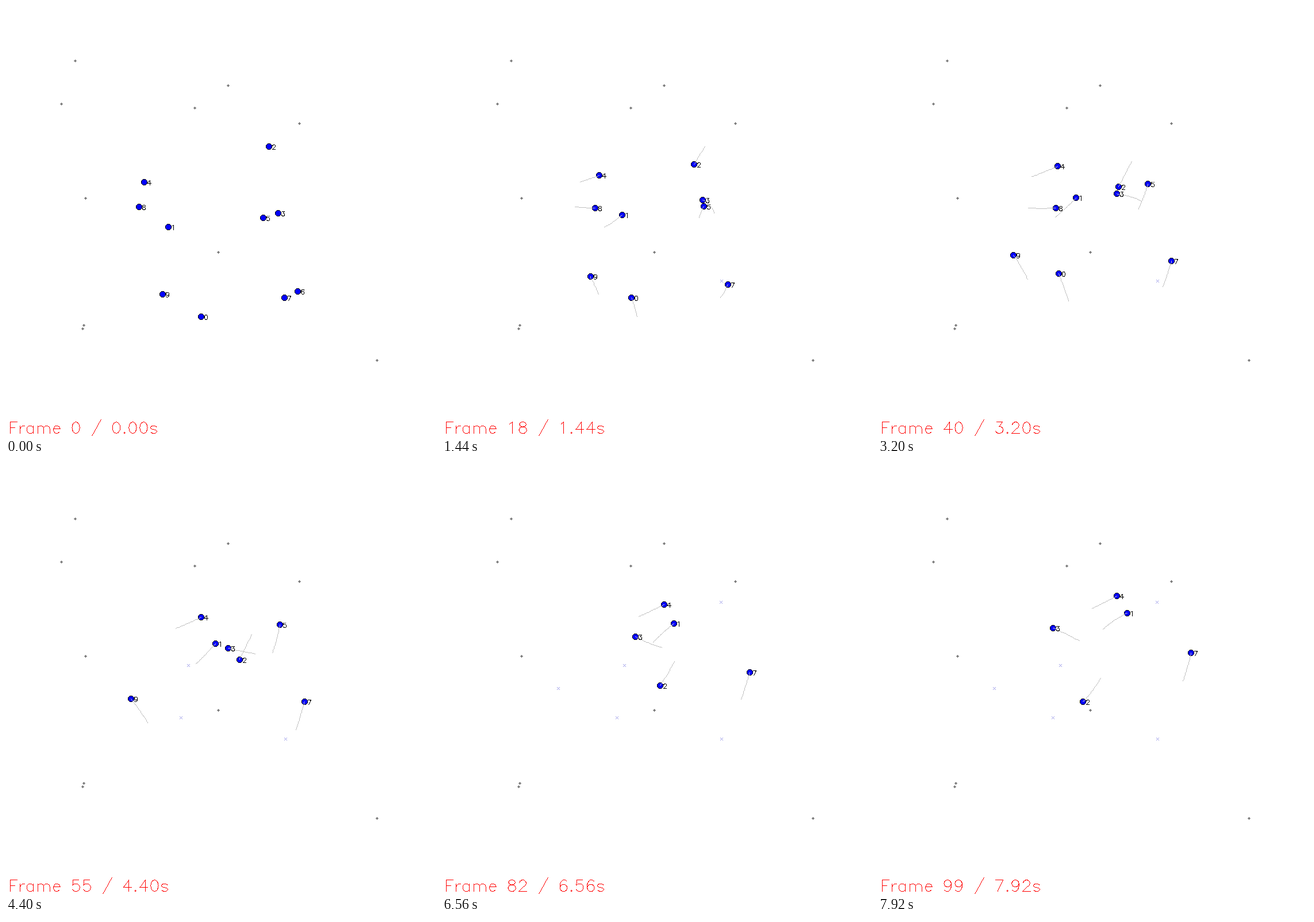
A matplotlib script that plays this animation: 748 by 748 pixels, repeating every 8 s.

```python
import numpy as np
import matplotlib.pyplot as plt
from matplotlib.animation import FuncAnimation

SIZE, FRAMES, STEP_MS, TRAIL = 748, 100, 80, 25
PX = 0.72  # one pixel in points at 100 dpi
plt.rcParams["path.simplify"] = False


def arc(cx, cy, rx, ry, start, end):
    a = np.radians(np.linspace(start, end, 17))
    return list(zip(cx + rx * np.cos(a), cy + ry * np.sin(a)))


# Stroke font: advance width and strokes; y runs from 0 (cap top) to 21 (baseline).
GLYPHS = {" ": (16, [])}


def glyph(char, width, *strokes):
    GLYPHS[char] = (width, [np.array(s, float) for s in strokes])


six = arc(11.5, 10.5, 7.5, 10.5, -50, -180) + arc(10.5, 14.5, 6.5, 6.5, 180, -180)
arch = arc(9.5, 12.5, 5.5, 5.5, 180, 360) + [(15, 21)]
glyph("0", 20, arc(10, 10.5, 7, 10.5, 0, 360))
glyph("1", 20, [(6, 4), (11, 0), (11, 21)])
glyph("2", 20, arc(10, 6, 6, 6, 190, 390) + [(3, 21), (17, 21)])
glyph("3", 20, [(5, 0), (16, 0), (10, 8)] + arc(10, 14.5, 7, 6.5, -65, 155))
glyph("4", 20, [(13, 21), (13, 0), (3, 14), (18, 14)])
glyph("5", 20, [(15, 0), (5, 0), (4, 9)] + arc(10, 14, 7, 7, -135, 150))
glyph("6", 20, six)
glyph("7", 20, [(3, 0), (17, 0), (7, 21)])
glyph("8", 20, arc(10, 4.5, 6, 4.5, 0, 360), arc(10, 15, 7, 6, 0, 360))
glyph("9", 20, [(20 - x, 21 - y) for x, y in six])
glyph("F", 18, [(4, 21), (4, 0), (17, 0)], [(4, 10), (12, 10)])
glyph("r", 13, [(4, 7), (4, 21)], arc(11, 14, 7, 7, 180, 280))
glyph("a", 19, [(15, 7), (15, 21)], arc(9.5, 14, 6.5, 7, -35, -325))
glyph("m", 30, [(4, 7), (4, 21)], arch, [(x + 11, y) for x, y in arch])
glyph("e", 18, [(3, 13), (15, 13)] + arc(9, 14, 6, 7, -10, -320))
glyph("s", 17, arc(8.5, 10.5, 5.5, 3.5, -20, -250) + arc(8.5, 17.5, 5.5, 3.5, -70, 160))
glyph(".", 10, arc(5, 20, 1, 1, 0, 360))
glyph("/", 22, [(20, -4), (2, 28)])


def trace(stroke):
    """Pixels along a one-pixel polyline."""
    pixels = []
    for a, b in zip(stroke[:-1], stroke[1:]):
        steps = max(1, int(np.ceil(abs(b - a).max())))
        pixels.append(np.linspace(a, b, steps + 1))
    return np.vstack(pixels)


def text_pixels(text, x, baseline, scale):
    pixels = []
    for char in text:
        width, strokes = GLYPHS[char]
        pixels += [trace((s - (0, 21)) * scale + (x, baseline)) for s in strokes]
        x += width * scale
    return pixels


class Walker:
    """Follows a smooth curve through points evenly spaced in time, then stops."""

    def __init__(self, name, last, *points):
        self.name, self.last = name, last
        t = np.linspace(0, 1, len(points))
        now = np.minimum(np.arange(FRAMES) / last, 1)
        curves = [np.polyval(np.polyfit(t, c, len(t) - 1), now) for c in np.transpose(points)]
        self.path = np.rint(np.column_stack(curves) - 0.5)


walkers = [
    Walker("0", 52, (340, 541), (324.6, 492.5), (304.5, 442)),
    Walker("1", 99, (283, 385), (335, 343.5), (379.5, 298), (433.4, 259)),
    Walker("2", 99, (458, 244.5), (425, 302), (396, 359), (356.8, 413.8)),
    Walker("3", 99, (473.8, 360.5), (442.6, 332.8), (397, 323), (350.5, 307.4), (304.5, 285)),
    Walker("4", 99, (240, 306.4), (300.5, 284), (358.7, 258), (415.8, 229.8)),
    Walker("5", 74, (447.5, 369), (455.5, 348), (468, 315), (476.7, 278.4), (485.8, 240.8)),
    Walker("6", 13, (508, 497), (486.5, 479)),
    Walker("7", 99, (484, 507.4), (501.5, 472.3), (516.2, 424.5), (531, 377), (544.6, 328.8)),
    Walker("8", 44, (231.5, 349.4), (274.8, 352), (317.5, 351)),
    Walker("9", 66, (272.5, 502), (243.3, 445), (202.5, 390.5)),
]

MARKS = [(120, 95), (386, 138), (96, 170), (328, 177), (510, 204),
         (138, 334), (369, 428), (135, 555), (133, 561), (645, 616)]

# Stamps: pixel offsets around a centre.
grid = np.stack(np.meshgrid(range(-5, 6), range(-5, 6)), -1).reshape(-1, 2)
radius = np.hypot(*grid.T)
DISC, CORE = grid[radius < 5.4], grid[radius < 4.5]
DIAMOND = grid[abs(grid).sum(1) <= 2]
CROSS = grid[(abs(grid[:, 0]) == abs(grid[:, 1])) & (radius < 3)]

fig = plt.figure(figsize=(SIZE / 100, SIZE / 100), dpi=100, facecolor="white")
ax = fig.add_axes([0, 0, 1, 1])
ax.axis("off")


def layer(color):
    line, = ax.plot([], [], color=color, lw=PX, solid_capstyle="butt", snap=False)
    return line


def paint(line, pixel_sets):
    """Show each pixel as a horizontal dash one pixel long."""
    pixels = np.rint(np.vstack([np.empty((0, 2)), *pixel_sets]))
    x, y = np.unique(pixels, axis=0).T
    gap = np.full_like(x, np.nan)
    line.set_data(np.column_stack([x, x + 1, gap]).ravel(), np.repeat(y + 0.5, 3))


marks, crosses, outlines, cores, trails, labels, caption = map(layer, [
    "#808080", "#9c9ce8", "#000000", "#0000ff", "#c0c0c0", "#000000", "#ff0000"])
paint(marks, [DIAMOND + m for m in MARKS])
ax.set_xlim(0, SIZE)
ax.set_ylim(SIZE, 0)


def draw(n):
    active = [w for w in walkers if n <= w.last]
    paint(crosses, [CROSS + w.path[-1] for w in walkers if n > w.last])
    paint(outlines, [DISC + w.path[n] for w in active])
    paint(cores, [CORE + w.path[n] for w in active])
    paint(trails, [trace(w.path[max(0, n - TRAIL):n + 1]) for w in active] if n else [])
    paint(labels, [p for w in active
                   for p in text_pixels(w.name, *(w.path[n] + (4.5, 5)), 0.4)])
    seconds = n * STEP_MS / 1000
    paint(caption, text_pixels(f"Frame {n} / {seconds:.2f}s", 3.3, 743, 0.95))
    return crosses, outlines, cores, trails, labels, caption


anim = FuncAnimation(fig, draw, frames=FRAMES, interval=STEP_MS, repeat=True)
plt.show()
```
